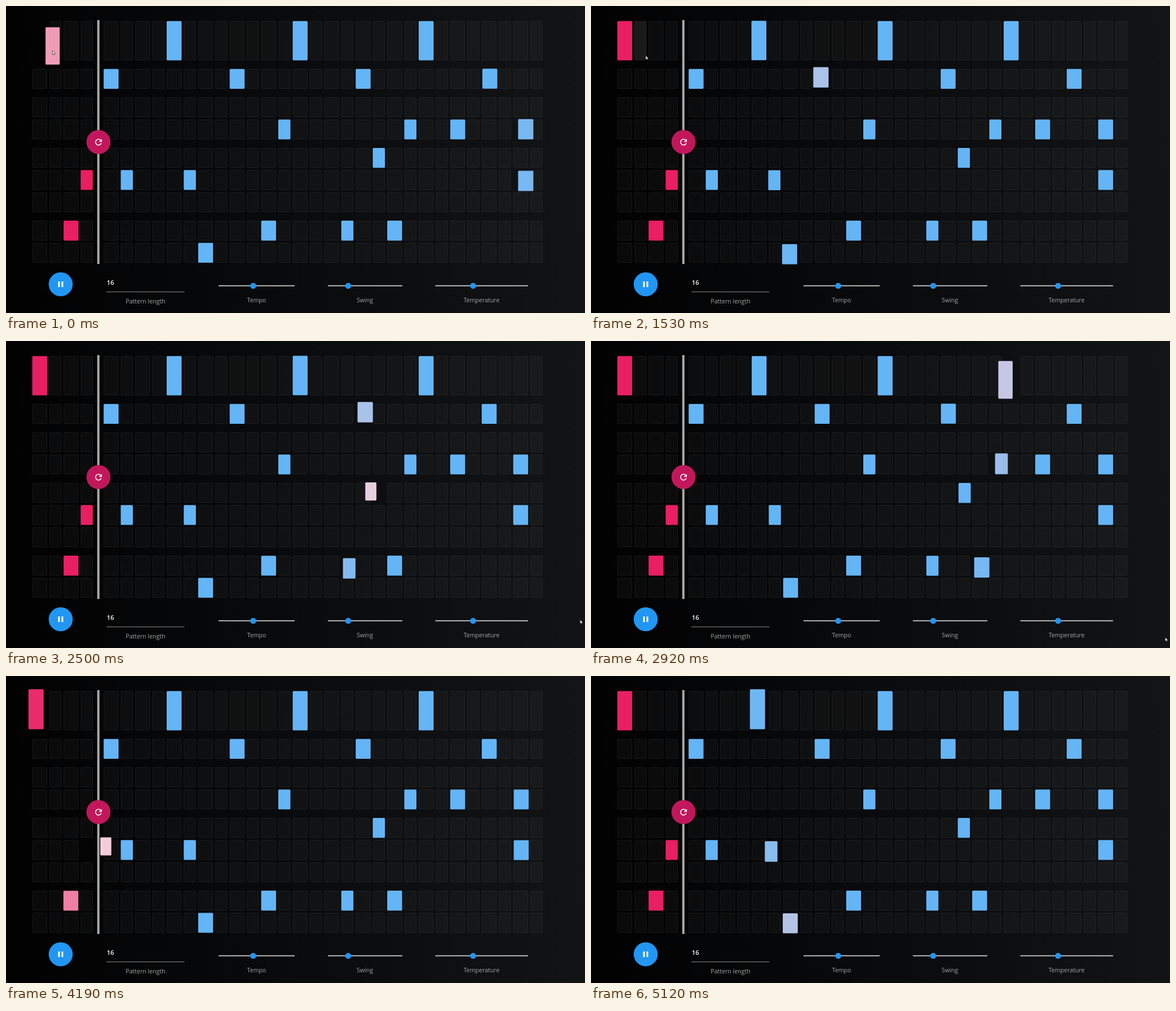
These frames come from a looping animation (1027x545 px, 5.14 s). An HTML page:

```html
<!DOCTYPE html>
<html lang="en">
<head>
<meta charset="utf-8">
<title>Drum pattern</title>
<style>
  html, body { margin: 0; width: 100%; height: 100%; overflow: hidden; background: #000; }
  svg { display: block; width: 100vw; height: 100vh; font: 10.6px "Open Sans", "Noto Sans", sans-serif; }
  .cell { fill: rgba(150, 150, 150, .052); stroke: rgba(150, 150, 150, .13); }
  .label { fill: #a6a6a6; text-anchor: middle; }
</style>
</head>
<body>
<svg id="stage" viewBox="0 0 1027 545" preserveAspectRatio="none">
  <defs>
    <linearGradient id="bg" gradientUnits="userSpaceOnUse" x1="0" y1="60" x2="1027" y2="0">
      <stop offset="0" stop-color="#020203"/>
      <stop offset=".45" stop-color="#090a0b"/>
      <stop offset="1" stop-color="#131415"/>
    </linearGradient>
  </defs>
  <rect width="1027" height="545" fill="url(#bg)"/>
  <g id="grid"></g>

  <rect x="161.8" y="25" width="4" height="433" fill="#a9a9a9"/>
  <circle cx="164" cy="241.5" r="21.3" fill="#c2185b"/>
  <path d="M167.9 238.2A5.2 5.2 0 1 0 169 243.5" fill="none" stroke="#fff" stroke-width="1.6"/>
  <path d="M170 236v5.3h-5.3z" fill="#fff"/>

  <circle cx="97" cy="494" r="21.3" fill="#2196f3"/>
  <path d="M92.5 489h3v10h-3zM98.5 489h3v10h-3z" fill="#fff"/>

  <text x="178.7" y="494.8" font-size="11.3" font-weight="600" fill="#fff">16</text>
  <rect x="178" y="507" width="138.5" height="1" fill="#8a8a8a"/>
  <text class="label" x="247.5" y="528">Pattern length</text>
  <g id="sliders"></g>
  <path id="cursor" d="M0 0V7.2L1.7 5.7L2.8 8L4 7.4L2.9 5.2H5z" fill="#fff" stroke="#000" stroke-width=".6"/>
</svg>
<script>
const LOOP = 5140;
const HOLD = 138.3;          // the screen refreshes in steps
const LEAD = 20;             // time shown within each refresh
const BAR = 3858;            // 32 steps
const PAIR = BAR / 16;       // two steps, the second one swung
const SWING = 125;
const FIRST_HIT = -57;
const PEAK = 210;            // age at which a struck note is largest
const CENTER = { x: 499.5, y: 241 };
const BLUE = [100, 181, 246], PINK = [233, 30, 99], FLASH = [248, 208, 220];

const every8 = from => [0, 8, 16, 24].map(n => n + from);
// Instruments in groups; each row lists its struck steps
const GROUPS = [
  [every8(0)],
  [every8(4)],
  [[], [15, 23, 26, 30]],
  [[21], [3, 5, 9, 30], []],
  [[2, 14, 19, 22], [10]]
];
// Cursor legs: start, end, x, y reached
const REST = { x: 82.5, y: 79 };
const LEGS = [
  [1260, 1540, 97, 88], [1810, 2090, 261.5, 165], [2090, 2380, 1018, 462], [2380, 2900, 1018.5, 526]
];
const CURSOR_END = 3340;

const $ = id => document.getElementById(id);
const clamp = v => Math.min(1, Math.max(0, v));

function add(parent, tag, attrs, text) {
  const el = document.createElementNS("http://www.w3.org/2000/svg", tag);
  for (const k in attrs) el.setAttribute(k, attrs[k]);
  if (text) el.textContent = text;
  parent.appendChild(el);
  return el;
}

function column(step) {
  const odd = step % 2, k = step >> 1;
  const x = step < 4 ? 46.6 + 55.5 * k : 173.2 + 55.88 * (k - 2);
  return { x: x + odd * 30.3, width: odd ? 21.6 : 26.5 };
}

const notes = [];
let hoverCell;

function addRow(struck, y, height) {
  for (let step = 0; step < 32; step++) {
    const { x, width } = column(step);
    if (struck.includes(step)) {
      const el = add($("grid"), "rect", { x, y, width, height, rx: 1.5 });
      const hit = FIRST_HIT + PAIR * (step >> 1) + SWING * (step % 2);
      notes.push({ el, hit, base: step < 4 ? PINK : BLUE });
    } else {
      const el = add($("grid"), "rect", {
        class: "cell", x: x + .5, y: y + .5, width: width - 1, height: height - 1, rx: 1.5
      });
      if (step === 1) hoverCell ??= el;
    }
  }
}

let top_ = 26.7;
GROUPS.forEach((rows, g) => {
  for (const struck of rows) {
    const height = g ? 35.3 : 69.9;
    addRow(struck, top_, height);
    top_ += height + 4.1;
  }
  top_ += 11;
});

function addSlider(name, x, width, knob, mid) {
  const g = $("sliders");
  add(g, "rect", { x, y: 495.8, width, height: 1.7, fill: "#d4d4d4" });
  add(g, "circle", { cx: knob, cy: 496.8, r: 5.3, fill: "#2196f3" });
  add(g, "text", { class: "label", x: mid, y: 526 }, name);
}
addSlider("Tempo", 377, 135, 438.5, 444.5);
addSlider("Swing", 571, 132, 607, 636.5);
addSlider("Temperature", 761.5, 164.5, 828.5, 843.5);

// Grows from small to slightly too large, then settles
function bounce(age) {
  if (age < PEAK) return .905 + .145 * (1 - Math.cos(Math.PI * age / PEAK)) / 2;
  return 1 + .05 * Math.exp((PEAK - age) / 130);
}

function drawNote({ el, hit, base }, t) {
  const age = (t - hit + BAR) % BAR;
  const s = bounce(age);
  const glow = clamp(1 - age / 530) ** 2.2;
  const rgb = base.map((c, i) => Math.round(c + (FLASH[i] - c) * glow));
  el.setAttribute("fill", `rgb(${rgb})`);
  el.setAttribute("transform",
    `translate(${CENTER.x * (1 - s)} ${CENTER.y * (1 - s)}) scale(${s})`);
}

function drawCursor(t) {
  let { x, y } = REST;
  for (const [from, to, toX, toY] of LEGS) {
    const p = 1 - (1 - clamp((t - from) / (to - from))) ** 2.5;
    x += (toX - x) * p;
    y += (toY - y) * p;
  }
  $("cursor").setAttribute("visibility", t < CURSOR_END ? "visible" : "hidden");
  $("cursor").setAttribute("transform", `translate(${x} ${y})`);
}

function draw(t) {
  notes.forEach(n => drawNote(n, t));
  drawCursor(t);
  const hover = t < 2200 ? .16 * clamp((t - 1410) / 240) : 0;
  hoverCell.style.fill = hover ? `rgba(255, 255, 255, ${hover})` : "";
}

const start = performance.now();

function frame() {
  const t = (performance.now() - start) % LOOP;
  draw(Math.floor(t / HOLD) * HOLD + LEAD);
  requestAnimationFrame(frame);
}
frame();
</script>
</body>
</html>
```
